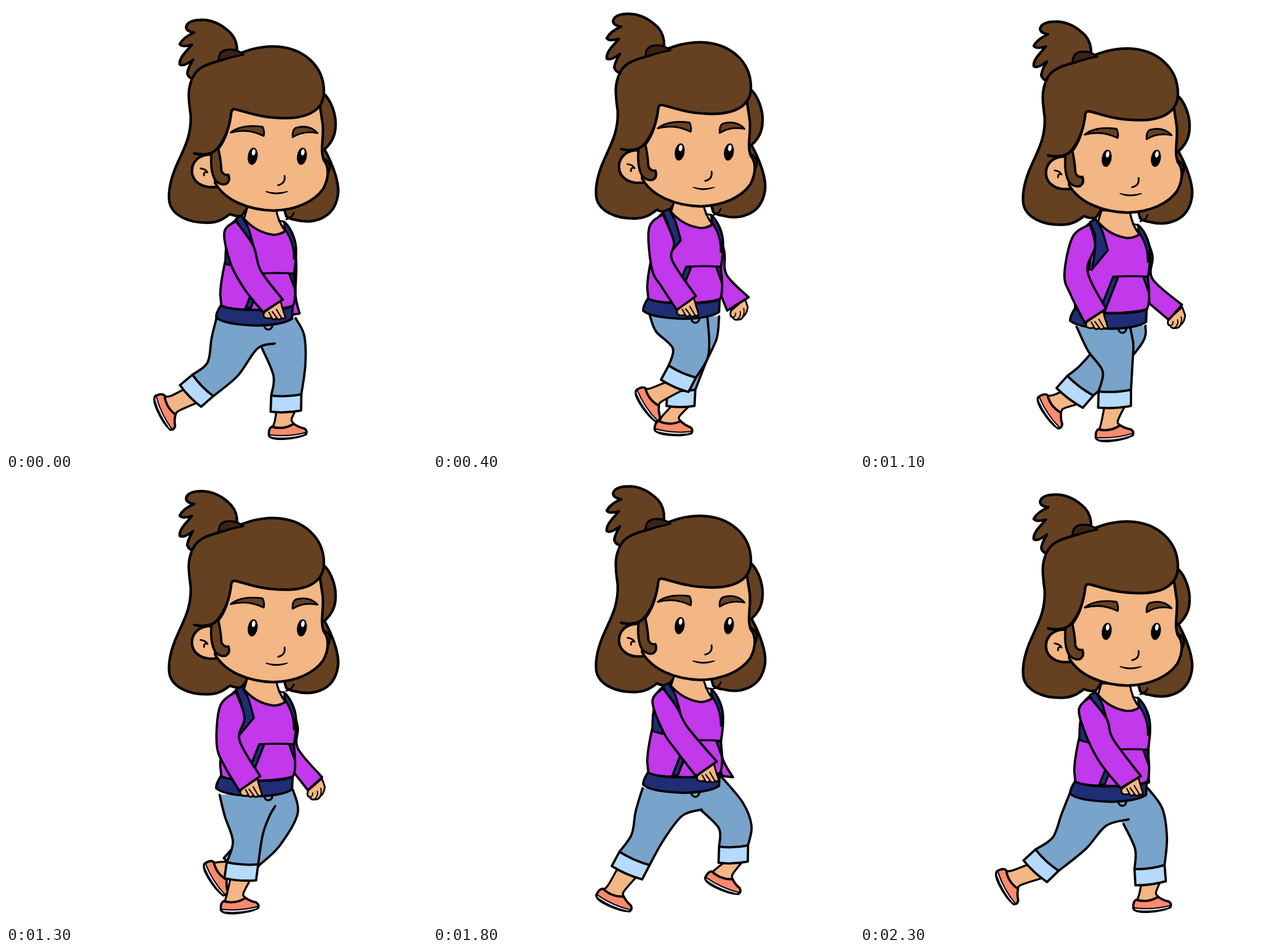
Write an HTML page with a canvas that moves like this. It is 727x770 px and loops after 2.4 s.

```html
<!DOCTYPE html>
<html lang="en">
<head>
<meta charset="utf-8">
<title>Walk cycle</title>
<style>
html, body { margin: 0; width: 100%; height: 100%; overflow: hidden; background: #fff; }
canvas { display: block; width: 727px; height: 770px; }
</style>
</head>
<body>
<canvas id="stage" width="727" height="770"></canvas>
<script>
const ctx = document.getElementById('stage').getContext('2d');
const LOOP = 2400, STEP = 100;
const INK = '#000', HAIR = '#654122', SKIN = '#f3b685', TOP = '#c238eb', NAVY = '#1f2d75',
      JEANS = '#78a3ca', CUFF = '#b5dafc', SHOE = '#fe8a6e', SOLE = '#dcdcec';

// Rows are [time, ...values]; returns a smooth periodic sampler without overshoot.
function track(period, rows) {
  const n = rows.length;
  const row = i => rows[(i + n) % n];
  const time = i => row(i)[0] + Math.floor(i / n) * period;
  const rate = (i, k) => (row(i + 1)[k] - row(i)[k]) / (time(i + 1) - time(i));
  const slope = (i, k) => {
    const a = rate(i - 1, k), b = rate(i, k);
    return a * b <= 0 ? 0 : 2 * a * b / (a + b);
  };
  return t => {
    t %= period;
    let i = n - 1;
    while (i > 0 && rows[i][0] > t) i--;
    const h = time(i + 1) - time(i), u = (t - time(i)) / h, v = 1 - u;
    return row(i).slice(1).map((a, j) => {
      const k = j + 1, b = row(i + 1)[k];
      return a * (1 + 2 * u) * v * v + b * u * u * (3 - 2 * u)
        + h * (slope(i, k) * u * v * v - slope(i + 1, k) * u * u * v);
    });
  };
}

const bobAt = track(1200, [[0, 0], [300, -10], [450, -12], [600, -10], [700, -4.5], [1060, 6.6]]);
const tailAt = track(1200, [[0, 0], [300, -2], [650, -5], [1100, -.5]]);

// Back side down to the cuff, then front side up to the waist.
const nearLegAt = track(LOOP, [
  [0, 364,538, 355,575, 348,617, 322,638, 358,675, 400,640, 434,593, 464,584],
  [400, 374,534, 385,563, 414,592, 407,622, 454,643, 474,610, 477,580, 474,540],
  [700, 378,542, 400,577, 432,605, 439,647, 490,639, 489,590, 486,565, 480,546],
  [900, 374,550, 400,590, 438,622, 447,665, 500,658, 490,605, 482,580, 475,555],
  [1100, 374,555, 394,597, 419,632, 412,667, 468,664, 471,610, 472,585, 467,558],
  [1500, 363,537, 361,570, 366,620, 354,656, 406,668, 418,620, 440,580, 464,572],
  [1800, 362,535, 350,575, 343,615, 322,645, 374,668, 398,625, 430,583, 464,572],
  [2300, 365,537, 348,580, 333,620, 303,641, 343,678, 390,640, 425,600, 464,589]
]);
// Front side down to the cuff, then back side up to the crotch.
const farLegAt = track(LOOP, [
  [0, 500,540, 515,570, 517,620, 510,672, 458,674, 462,640, 442,592],
  [400, 494,537, 490,575, 472,615, 453,664, 405,664, 420,625, 425,600],
  [700, 492,543, 485,575, 440,640, 426,667, 372,650, 392,620, 408,582],
  [1100, 493,553, 488,582, 440,640, 403,674, 358,640, 378,624, 400,600],
  [1500, 498,520, 523,575, 518,625, 493,655, 449,632, 466,605, 448,578],
  [1800, 497,514, 535,560, 550,600, 544,634, 494,636, 494,605, 464,574],
  [2000, 497,522, 535,560, 560,605, 578,655, 530,667, 512,625, 462,582],
  [2300, 497,535, 522,570, 530,620, 526,668, 474,675, 475,640, 455,597]
]);
// x, y, angle
const nearFootAt = track(LOOP, [
  [0, 276,703,68], [400, 373,690,60], [700, 467,720,5], [900, 476,737,-6],
  [1100, 440,740,-3], [1500, 368,737,2], [1800, 314,730,28], [2300, 256,706,65]
]);
const farFootAt = track(LOOP, [
  [0, 487,737,0], [400, 416,731,8], [700, 365,718,35], [1100, 330,702,60],
  [1500, 423,685,62], [1800, 502,700,28], [2000, 556,735,-6], [2300, 505,737,0]
]);
// Outer side down to the cuff, then inner side up to the armpit.
const nearArmAt = track(LOOP, [
  [0, 377,392, 388,446, 412,490, 444,530, 478,508, 440,458, 427,415],
  [400, 373,385, 378,455, 395,486, 421,526, 454,502, 413,440, 416,408],
  [700, 371,390, 368,450, 378,485, 405,536, 439,515, 407,448, 413,415],
  [1100, 367,400, 353,465, 364,500, 388,548, 425,524, 393,460, 406,415],
  [1500, 374,386, 381,450, 398,488, 427,526, 462,500, 420,440, 419,408],
  [1800, 379,385, 398,438, 420,470, 454,514, 490,489, 440,430, 421,395],
  [2300, 378,400, 393,450, 416,493, 450,535, 485,514, 437,450, 426,415]
]);
const farArmAt = track(LOOP, [
  [0, 501,440, 500,500, 507,532, 490,535, 480,500],
  [400, 503,425, 507,465, 545,504, 508,527, 497,500],
  [700, 508,420, 512,460, 567,502, 543,529, 502,498],
  [1100, 505,432, 505,472, 556,517, 533,543, 500,515],
  [1500, 502,425, 503,460, 534,515, 509,530, 496,500],
  [1800, 497,425, 499,480, 518,516, 500,514, 490,490],
  [2300, 498,430, 498,490, 499,525, 485,530, 480,500]
]);

const pairs = v => v.reduce((list, x, i) => (i % 2 || list.push([x, v[i + 1]]), list), []);
const middle = (a, b) => [(a[0] + b[0]) / 2, (a[1] + b[1]) / 2];

function paint(path, fill, width = 4) {
  if (fill) { ctx.fillStyle = fill; ctx.fill(path); }
  if (width) { ctx.lineWidth = width; ctx.stroke(path); }
}
const draw = (d, fill, width) => paint(new Path2D(d), fill, width);

function placed(x, y, degrees, body) {
  ctx.save();
  ctx.translate(x, y);
  ctx.rotate(degrees * Math.PI / 180);
  body();
  ctx.restore();
}

// Adds a smooth curve through the points to a path.
function curve(path, pts, join) {
  path[join ? 'lineTo' : 'moveTo'](...pts[0]);
  for (let i = 0; i < pts.length - 1; i++) {
    const a = pts[i - 1] || pts[i], b = pts[i], c = pts[i + 1], d = pts[i + 2] || c;
    path.bezierCurveTo(b[0] + (c[0] - a[0]) / 6, b[1] + (c[1] - a[1]) / 6,
      c[0] - (d[0] - b[0]) / 6, c[1] - (d[1] - b[1]) / 6, c[0], c[1]);
  }
}

function leg(down, up, waist, foot, back, front) {
  const fill = new Path2D(), line = new Path2D();
  curve(fill, down);
  curve(fill, up, true);
  fill.lineTo(...waist);
  curve(line, down);
  curve(line, up);

  const dx = front[0] - back[0], dy = front[1] - back[1], len = Math.hypot(dx, dy);
  const nx = -dy / len * 28, ny = dx / len * 28;
  const low = s => [back[0] + dx * s + nx, back[1] + dy * s + ny];

  const [x, y, angle] = foot, r = angle * Math.PI / 180;
  const onFoot = (a, b) => [x + a * Math.cos(r) - b * Math.sin(r), y + a * Math.sin(r) + b * Math.cos(r)];
  const ankle = new Path2D();
  curve(ankle, [low(.15), onFoot(-23, -18), onFoot(-27, -7)]);
  curve(ankle, [onFoot(-5, -3), onFoot(10, -12), onFoot(6, -21), low(.78)], true);
  paint(ankle, SKIN, 3.5);
  placed(x, y, angle, () => {
    draw('M-28-9Q-8-3 10-14Q18-8 28-6Q34-2 31 4Q16 11-8 12Q-30 13-33 6Q-34-6-28-9Z', SHOE);
    draw('M-32 5Q0 9 31 1Q32 4 26 6Q0 13-26 10Q-32 9-32 5Z', SOLE, 2);
  });

  paint(fill, JEANS, 0);
  paint(line);
  const cuff = new Path2D(), a = low(-.04), b = low(.97), m = low(.45);
  cuff.moveTo(...back);
  cuff.quadraticCurveTo(back[0] + dx / 2 + nx * .15, back[1] + dy / 2 + ny * .15, ...front);
  cuff.lineTo(...b);
  cuff.quadraticCurveTo(m[0] + nx * .14, m[1] + ny * .14, ...a);
  cuff.closePath();
  paint(cuff, CUFF);
}

function legs(t, bob) {
  const f = pairs(farLegAt(t)), n = pairs(nearLegAt(t));
  leg(f.slice(0, 4), f.slice(4), [395, 545 + bob], farFootAt(t), f[4], f[3]);
  leg(n.slice(0, 4), n.slice(4), [468, 545 + bob], nearFootAt(t), n[3], n[4]);
}

function sleeve(down, up) {
  const path = new Path2D();
  curve(path, down);
  curve(path, up, true);
  path.closePath();
  paint(path, TOP);
}

function farArm(t, bob) {
  const p = pairs(farArmAt(t)), [x, y] = middle(p[2], p[3]);
  if (x > 512) placed(x, y, 0, () => {
    draw('M-12 12Q-15 22-9 23Q-6 29 0 27Q6 28 9 22Q16 17 17 5L12-9Z', SKIN, 3);
    draw('M-4 16Q-3 22-9 23M0 26Q6 20 4 13M9 21Q12 14 10 8', null, 2);
  });
  sleeve([[490, 385 + bob], ...p.slice(0, 3)], p.slice(3));
}

function nearArm(t, bob) {
  const p = pairs(nearArmAt(t)), [x, y] = middle(p[3], p[4]), top = [397, 372 + bob];
  placed(x, y, 0, () => {
    draw('M-15 11Q-18 18-14 20Q-8 23-3 20Q1 26 6 21Q11 26 15 21Q23 24 20 15Q16 4 13-9Z', SKIN, 3);
    draw('M-7 11L-2 20M-1 10L7 21M6 6L15 21', null, 2.3);
  });
  sleeve([top, ...p.slice(0, 4)], [...p.slice(4), top]);
}

function torso() {
  draw('M417 348L411 368Q432 394 462 398L483 390Q470 375 466 350Z', SKIN, 3.5);
  draw('M446 552A7 8 0 0 0 460 552', JEANS, 3.5);
  draw('M404 366Q380 378 384 400L379 440Q370 480 370 500L372 519Q380 525 440 526Q485 524 496 518Q502 505 497 465Q503 430 500 412Q496 388 479 373L482 389Q478 395 462 396Q432 392 411 368Z', TOP);
  draw('M384 395Q378 415 379 446L396 451L402 400Z', NAVY, 3.5);
  draw('M397 368L407 363Q416 378 419 385Q424 402 428 417L400 451Q408 415 406 390Z', NAVY, 3.5);
  draw('M471 371L481 374L482 388Z', '#fff', 3);
  draw('M480 373Q493 383 500 412Q501 425 497 437Q498 410 482 387Z', NAVY, 3.5);
  draw('M437 463H446L423 522L413 524Z', NAVY, 3.5);
  draw('M489 463H497L499 491Z', NAVY, 3.5);
  draw('M438 463Q470 461 497 463', null, 3.5);
  draw('M371 518Q362 532 363 539Q376 551 432 553Q478 552 494 541L495 519Q482 526 440 526Q390 527 371 518Z', NAVY);
}

function ponytail() {
  draw('M325 126Q316 126 313 117Q314 107 323 93Q306 106 300 101Q299 93 308 82L321 67Q304 72 300 66Q306 54 325 46Q311 44 311 36Q314 23 342 24Q368 26 389 48Q400 61 399 80L360 110Z', HAIR, 4.5);
}

function backHair() {
  draw('M322 125C312 145 316 165 319 190C320 225 308 245 297 270C284 298 280 320 282 338C286 362 315 376 350 375C370 374 378 366 387 360Q398 365 407 363L420 345L480 350L484 364Q490 369 500 370C525 377 566 372 573 328C577 305 562 270 550 248C568 232 570 215 569 198C567 178 558 160 549 152L470 90Z', HAIR, 4.5);
  draw('M484 369Q494 367 497 358', null, 3);
}

function eye(x) {
  placed(x, 260, 9, () => {
    ctx.fillStyle = INK;
    ctx.beginPath(); ctx.ellipse(0, 0, 8.5, 15, 0, 0, 7); ctx.fill();
    ctx.fillStyle = '#fff';
    ctx.beginPath(); ctx.ellipse(.5, -7, 3, 5.5, 0, 0, 7); ctx.fill();
  });
}

function head() {
  draw('M549 264Q560 270 559 281Q557 293 547 299Z', SKIN);
  draw('M355 257C333 256 321 270 321 286C322 304 338 316 364 313L372 280Z', SKIN, 4.5);
  draw('M336 281Q345 282 348 288M347 287Q341 287 342 293', null, 3);
  draw('M388 175C387 215 376 235 366 248L361 306C378 336 418 353 462 354C500 353 532 339 548 316C560 293 556 275 549 267C542 250 549 230 547 205L542 172Z', SKIN, 4.5);
  draw('M355 254Q352 285 361 301Q370 311 380 308Q388 303 384 292Q376 294 372 285Q371 265 366 244', HAIR);
  draw('M322 125C328 108 345 101 368 95C400 86 420 70 462 70C515 71 549 105 549 148C549 178 525 194 482 194C440 194 415 183 397 179C389 177 389 183 388 192C385 212 378 230 366 245C357 257 343 259 325 255', HAIR, 4.5);
  draw('M367 95Q367 78 380 76Q397 73 410 84Q390 88 367 95Z', '#3a2314', 3.5);
  draw('M388 219Q406 204 443 209Q447 217 445 225Q418 211 388 219Z', HAIR, 3);
  draw('M495 227Q494 215 500 211Q524 204 538 220Q514 215 495 227Z', HAIR, 3);
  eye(426);
  eye(511);
  draw('M481 294Q483 307 470 310', null, 3);
  draw('M449 321Q466 326 486 321Q466 329 449 321Z', INK, 1.5);
}

function render(t) {
  const [bob] = bobAt(t), [tail] = tailAt(t), nod = bob * .63;
  ctx.fillStyle = '#fff';
  ctx.fillRect(0, 0, 727, 770);
  ctx.strokeStyle = INK;
  ctx.lineJoin = ctx.lineCap = 'round';
  placed(0, nod + tail, 0, ponytail);
  placed(0, nod, 0, backHair);
  farArm(t, bob);
  legs(t, bob);
  placed(0, bob, 0, torso);
  nearArm(t, bob);
  placed(0, nod, 0, head);
}

const start = performance.now();
function tick() {
  const elapsed = performance.now() - start;
  render(Math.floor(elapsed / STEP) * STEP % LOOP);
  requestAnimationFrame(tick);
}
tick();
</script>
</body>
</html>
```
